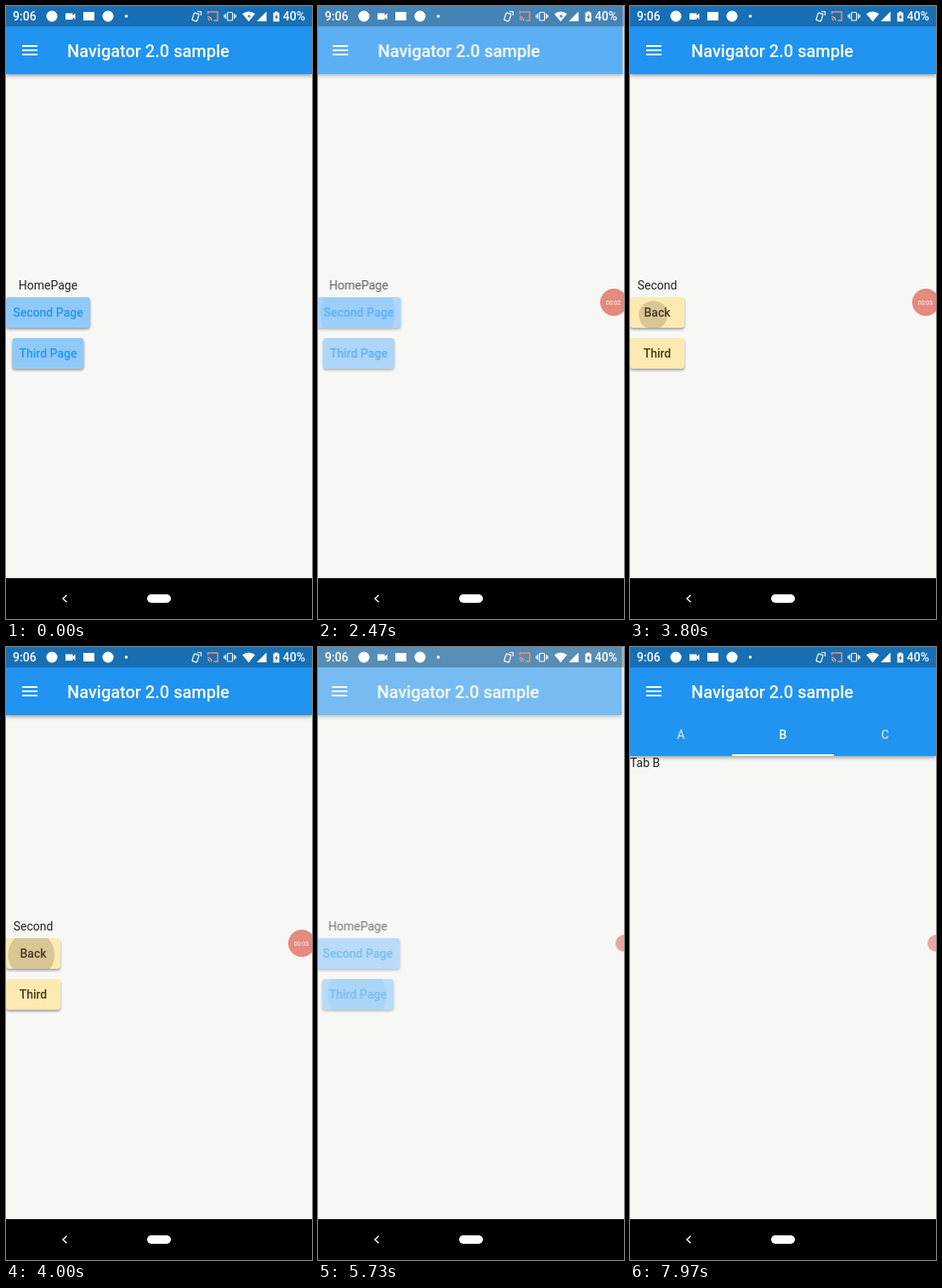
Animation of 360 by 720 pixels, one loop 8 s. Source, as an HTML page:

```html
<!DOCTYPE html>
<html lang="en">
<head>
<meta charset="utf-8">
<title>Page navigation</title>
<style>
  html, body { margin: 0; width: 100%; height: 100%; overflow: hidden; background: #f7f7f6; }
  svg { display: block; width: 100vw; height: 100vh; }
  text { font-family: Roboto, "Noto Sans", sans-serif; font-size: 14px; }
  .label { font-weight: 500; text-anchor: middle; }
  .body { fill: #202020; }
  .mid { text-anchor: middle; }
  .title { font-size: 20px; font-weight: 500; fill: #fff; }
  .bar { fill: #2094f0; filter: drop-shadow(0 2px 2px rgba(0,0,0,.36)); }
  .button { filter: drop-shadow(0 2px 1.5px rgba(0,0,0,.36)); }
  .line { fill: none; stroke: #fff; }
</style>
</head>
<body>
<svg id="stage" viewBox="0 0 360 720" xmlns="http://www.w3.org/2000/svg"></svg>
<script>
const LOOP = 8000;
const BLUE = { fill: '#90c9f9', ink: '#2196f3' };
const AMBER = { fill: '#fdeab2', ink: '#453a1b' };

// Touches: page elements react from down to up, then the ripple fades.
const presses = [
  { id: 'second', down: 2030, up: 2430, from: [45, 362], to: [49.5, 360], size: [99, 36], color: '#2196f3', alpha: .22 },
  { id: 'back', down: 3630, up: 4020, from: [26, 364], to: [32, 360], size: [64, 36], color: '#403820', alpha: .2 },
  { id: 'third', down: 5400, up: 5680, from: [46, 410], to: [49.5, 408], size: [84, 36], color: '#2196f3', alpha: .22 },
  { id: 'tabB', down: 7430, up: 7560, from: [176, 106], to: [180, 104], size: [120, 48], color: '#fff', alpha: .22 }
];

const moves = [
  { at: 2430, from: 'home', to: 'next', dir: 1 },
  { at: 4020, from: 'next', to: 'home', dir: -1 },
  { at: 5680, from: 'home', to: 'tabs', dir: 1 }
];
const MOVE_TIME = 300, SHIFT = 30;

const clamp = v => Math.max(0, Math.min(1, v));
const lerp = (a, b, k) => a + (b - a) * k;
const progress = (t, start, length) => clamp((t - start) / length);

function bezier(x1, y1, x2, y2) {
  const at = (a, b, s) => 3 * a * s * (1 - s) ** 2 + 3 * b * s * s * (1 - s) + s ** 3;
  return x => {
    if (x <= 0 || x >= 1) return clamp(x);
    let lo = 0, hi = 1;
    for (let i = 0; i < 24; i++) {
      const s = (lo + hi) / 2;
      if (at(x1, x2, s) < x) lo = s; else hi = s;
    }
    return at(y1, y2, lo);
  };
}
const ease = bezier(.25, .1, .25, 1);
const standard = bezier(.4, 0, .2, 1);
const accelerate = bezier(.4, 0, 1, 1);
const decelerate = bezier(0, 0, .2, 1);

const rect = (x, y, w, h, attrs = '') => `<rect x="${x}" y="${y}" width="${w}" height="${h}" ${attrs}/>`;

const text = (x, y, str, cls, attrs = '') => `<text x="${x}" y="${y}" class="${cls}" ${attrs}>${str}</text>`;

const ripple = id => `<clipPath id="${id}Clip"><rect id="${id}Box" rx="4"/></clipPath>
  <g clip-path="url(#${id}Clip)"><circle id="${id}Ripple" opacity="0"/></g>`;

const button = (cx, y, w, str, look, id) =>
  rect(cx - w / 2, y, w, 36, `rx="4" class="button" fill="${look.fill}"`) +
  (id ? ripple(id) : '') +
  text(cx, y + 23, str, 'label', `fill="${look.ink}"`);

const appBar = (height, extra = '') =>
  rect(0, 0, 360, height, 'class="bar"') +
  [46, 51, 56].map(y => rect(19, y, 18, 2, 'fill="#fff"')).join('') +
  text(72, 59.5, 'Navigator 2.0 sample', 'title') + extra;

const page = (id, content) => `<g id="${id}">${content}</g>`;

const tabLabels = ['A', 'B', 'C'].map((name, i) =>
  text(60 + 120 * i, 108, name, 'label', `id="tab${i}" fill="#fff"`)).join('');

const statusIcons = `
  ${text(8, 17, '9:06', '', 'font-weight="500"')}
  <circle cx="54" cy="12" r="6.5"/>
  <path d="M70 8.5h8.5v2.7l3-2.7v7.5l-3-2.7v2.7h-8.5z"/>
  ${rect(91, 7, 13, 10)}
  <circle cx="120" cy="12" r="6.5"/>
  <circle cx="141.5" cy="12" r="1.8"/>
  <g class="line" stroke-width="1.2">
    <rect x="220" y="8.5" width="6" height="9" rx="1" transform="rotate(18 223 13)"/>
    <path d="M225 6.5h4.500v4.500M226.500 9h1"/>
    <rect x="260.500" y="7.500" width="6" height="9.500" rx="1"/>
    <path d="M258.300 9v6M268.700 9v6M256.700 10.500v3M270.300 10.500v3"/>
  </g>
  <g fill="none" stroke="#ee9474" stroke-width="1.5">
    <path d="M237.500 9.500v-2.500h11.500v10h-4.500"/>
    <path d="M237 12.200a5 5 0 0 1 5 5M237 14.700a2.500 2.500 0 0 1 2.500 2.500"/>
  </g>
  <path d="M278 9.300q7.500-5.600 15 0l-7.500 9z"/>
  <circle id="wifiMark" cx="286" cy="12" r="1.700" fill="#4f8fc6"/>
  <path d="M306.500 6.500v11.500h-11.500z"/>
  <path d="M316.300 6.500h3.400v1.300h1.800v10.400h-7v-10.400h1.800z"/>
  <path d="M318.700 9.500l-2.500 4h1.500v3l2.400-4h-1.500z" fill="#2a72b2"/>
  ${text(352, 17, '40%', '', 'font-weight="500" text-anchor="end"')}`;

document.getElementById('stage').innerHTML =
  rect(0, 0, 360, 720, 'fill="#f7f7f6"') +
  page('home', appBar(80) +
    text(49.5, 333, 'HomePage', 'body mid') +
    button(49.5, 342, 99, 'Second Page', BLUE, 'second') +
    button(49.5, 390, 84, 'Third Page', BLUE, 'third')) +
  page('next', appBar(80) +
    text(32, 333, 'Second', 'body mid') +
    button(32, 342, 64, 'Back', AMBER, 'back') +
    button(32, 390, 64, 'Third', AMBER)) +
  page('tabs',
    `<g id="views">${text(180, 381, 'Third', 'body mid')}${button(180, 390, 64, 'Back', AMBER)}
      ${text(360, 141, 'Tab B', 'body')}</g>` +
    appBar(128, ripple('tabB') + tabLabels + rect(0, 126, 120, 2, 'id="indicator" fill="#fff"'))) +
  rect(0, 0, 360, 24, 'fill="#000" opacity=".25"') +
  `<g fill="#fff">${statusIcons}</g>` +
  rect(0, 672, 360, 48, 'fill="#000"') +
  '<path d="M71.500 691.800l-4.500 4.200 4.500 4.200" class="line" stroke-width="1.500"/>' +
  rect(166, 691, 28, 10, 'rx="5" fill="#fff"') +
  `<circle id="bubble" cy="348"/>` +
  text(347.5, 350.6, '', 'mid', 'id="timer" style="font-size:7px" fill="#fff"');

const el = id => document.getElementById(id);
const set = (id, attrs) => {
  for (const name in attrs) el(id).setAttribute(name, attrs[name]);
};

for (const { id, to: [x, y], size: [w, h], color } of presses) {
  set(id + 'Box', { x: x - w / 2, y: y - h / 2, width: w, height: h });
  set(id + 'Ripple', { fill: color });
}

function drawPages(t) {
  const state = { home: [0, 0], next: [0, 0], tabs: [0, 0] };
  const move = moves.filter(m => t >= m.at).pop();
  if (!move) state.home = [0, 1];
  else {
    const k = progress(t, move.at, MOVE_TIME), slide = SHIFT * standard(k);
    state[move.from] = [-move.dir * slide, 1 - accelerate(clamp(k / .3))];
    state[move.to] = [move.dir * (SHIFT - slide), decelerate(clamp((k - .3) / .7))];
  }
  for (const id in state) {
    const [x, opacity] = state[id];
    set(id, { transform: `translate(${x} 0)`, opacity, display: opacity ? 'inline' : 'none' });
  }
}

function drawRipple(t, { id, down, up, from, to, size, alpha }) {
  const held = ease(progress(Math.min(t, up), down, 1000));
  const k = lerp(held, 1, ease(progress(t, up, 225)));
  const full = Math.hypot(...size) / 2;
  set(id + 'Ripple', {
    cx: lerp(from[0], to[0], k),
    cy: lerp(from[1], to[1], k),
    r: lerp(full * .3, full, k),
    opacity: alpha * progress(t, down, 75) * (1 - progress(t, up + 225, 150))
  });
}

function drawTabs(t) {
  const k = ease(progress(t, 7560, 300));
  set('views', { transform: `translate(${-360 * k} 0)` });
  set('indicator', { x: 120 * k });
  [1 - k, k, 0].forEach((on, i) => set('tab' + i, { 'fill-opacity': lerp(.7, 1, on) }));
}

function drawBubble(t) {
  const shown = ease(progress(t, 60, 300));
  const docked = ease(progress(t, 4150, 250));
  set('bubble', {
    cx: lerp(lerp(378, 348, shown), 360, docked),
    r: lerp(16, 10, docked),
    fill: docked > .5 ? '#e7a79e' : '#e48a7e',
    opacity: shown
  });
  const seconds = [1200, 2230, 3230].filter(s => t >= s).length;
  el('timer').textContent = '00:0' + seconds;
  set('timer', { opacity: shown * (1 - clamp(docked * 2)), x: 347.5 + 30 * (1 - shown) });
}

function draw(t) {
  drawPages(t);
  presses.forEach(p => drawRipple(t, p));
  drawTabs(t);
  drawBubble(t);
  set('wifiMark', { opacity: t < 2870 ? 1 : 0 });
}

const start = performance.now();
function tick() {
  draw((performance.now() - start) % LOOP);
  requestAnimationFrame(tick);
}
tick();
</script>
</body>
</html>
```
